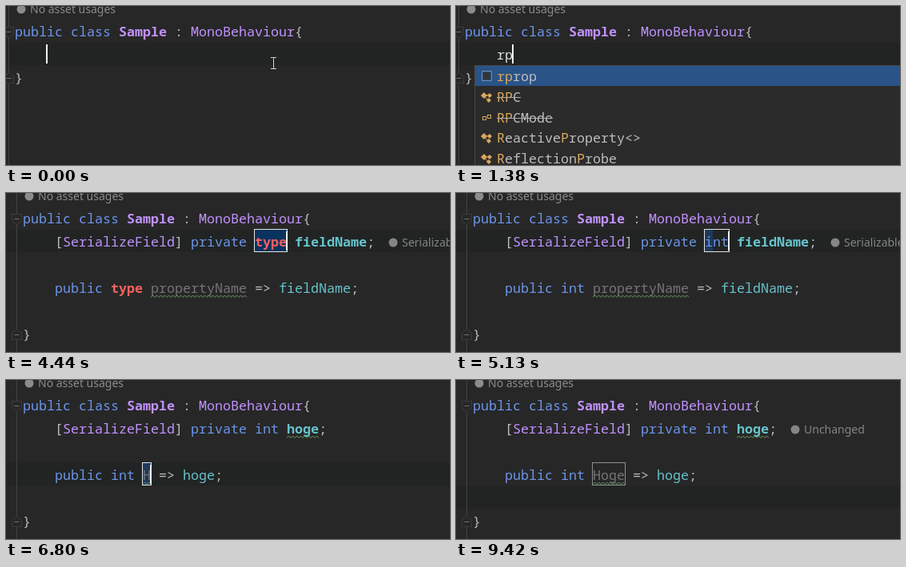
Recreate the animation shown at these times as an HTML page with a canvas. Size 555x199 px, loop 9.6 s.

```html
<!DOCTYPE html>
<html lang="en">
<head>
<meta charset="utf-8">
<title>Code template</title>
<style>
html, body { margin: 0; width: 100%; height: 100%; overflow: hidden; background: #272727; }
canvas { display: block; }
</style>
</head>
<body>
<canvas id="stage" width="555" height="199"></canvas>
<script>
const LOOP = 9600, W = 555, H = 199, CELL = 10, LINE = 29;
const g = document.getElementById('stage').getContext('2d');
const MONO = '16.667px "Noto Sans Mono", monospace';
const UI = '14px "Noto Sans", sans-serif';
const SELECT = '#08335e', LINKED = '#222e49';
// Capital letters mark the bold variant
const INK = { t: '#bdbdbd', w: '#dedede', k: '#6c95eb', c: '#c191ff', e: '#ff5f5f',
              f: '#66c3cc', d: '#747474', o: '#dba85c' };
const CARET_OFF = [[380, 880], [1880, 2370], [3940, 4440], [7930, 8130], [9420, LOOP]];
let left = 11;

const colX = col => left + col * CELL;
const rowY = row => 17 + (row - 1) * LINE;
const fill = (color, x, y, w, h) => { g.fillStyle = color; g.fillRect(x, y, w, h); };

function stroke(color, points, close) {
  g.strokeStyle = color;
  g.lineWidth = 1;
  g.beginPath();
  points.forEach(([x, y]) => g.lineTo(x, y));
  if (close) g.closePath();
  g.stroke();
}

function mono(str, style, x, y) {
  const key = style.toLowerCase();
  g.font = (key === style ? '' : 'bold ') + MONO;
  g.fillStyle = INK[key];
  g.fillText(str, x, y);
  return x + str.length * CELL;
}

function code(row, col, ...spans) {
  let x = colX(col);
  for (const [str, style] of spans) x = mono(str, style, x, rowY(row) + 21);
  return x;
}

function label(str, x, y, color) {
  g.fillStyle = color;
  g.beginPath();
  g.arc(x + 6, y - 5, 5.5, 0, 7);
  g.fill();
  g.font = UI;
  g.fillText(str, x + 17, y);
}

const mark = (color, row, col, len) => fill(color, colX(col), rowY(row), len * CELL, 28);

function frame(row, col, len, color = '#e4e4e4') {
  g.strokeStyle = color;
  g.lineWidth = 1;
  g.strokeRect(colX(col) - .5, rowY(row) - .5, len * CELL + 1, 28);
}

function squiggle(row, col, len) {
  const points = [];
  for (let i = 0; i <= len * 4; i++) {
    points.push([colX(col) + i * 2.5, rowY(row) + (i % 2 ? 24 : 26.5)]);
  }
  stroke('#6a9f62', points.filter(p => p[0] <= colX(col + len)));
}

function gutter(lastRow) {
  const x = left - 7.5;
  fill('#414141', x - .5, 0, 1, H);
  for (const [row, dir] of [[1, 1], [lastRow, -1]]) {
    const y = rowY(row) + 15.5;
    const points = [[-6, -6], [6, -6], [6, 2], [0, 7], [-6, 2]].map(([a, b]) => [x + a, y + b * dir]);
    g.fillStyle = '#272727';
    stroke('#505050', points, true);
    g.fill();
    stroke('#707070', [[x - 3, y], [x + 3, y]]);
  }
}

function pointer() {
  stroke('#d0d0d0', [[331, 64.5], [338, 64.5]]);
  stroke('#d0d0d0', [[334.5, 64], [334.5, 79]]);
  stroke('#d0d0d0', [[331, 78.5], [338, 78.5]]);
}

function icon(kind, y) {
  if (kind === 'template') {
    g.setLineDash([1, 1]);
    g.strokeStyle = '#c0c0c0';
    g.strokeRect(32.5, y - 6.5, 12, 12);
    g.setLineDash([]);
    fill('#343434', 34, y - 5, 9, 9);
  } else if (kind === 'enum') {
    g.strokeStyle = '#dba85c';
    g.strokeRect(33.5, y - 1.5, 4, 4);
    g.strokeRect(39.5, y - 3.5, 4, 4);
  } else {
    stroke('#dba85c', [[36, y - 1], [41, y - 3]]);
    stroke('#dba85c', [[36, y - 1], [40, y + 4]]);
    for (const [x, dy, r] of [[35, -2, 4], [42, -2, 3], [41, 4, 3]]) {
      g.fillStyle = '#dba85c';
      g.beginPath();
      g.moveTo(x - r, y + dy);
      g.lineTo(x, y + dy - r);
      g.lineTo(x + r, y + dy);
      g.lineTo(x, y + dy + r);
      g.fill();
    }
  }
}

// Each item: text, icon, indices of matched letters, struck out
const ONE_LETTER = [['rprop', 'template', [0]], ['readonly', 'template', [0]], ['ref', 'template', [0]],
  ['RuntimeInitializeOnLoad', 'class', [0]], ['RequireComponent', 'class', [0]]];
const TWO_LETTERS = [['rprop', 'template', [0, 1]], ['RPC', 'class', [0, 1], true],
  ['RPCMode', 'enum', [0, 1], true], ['ReactiveProperty<>', 'class', [0, 8]],
  ['ReflectionProbe', 'class', [0, 10]]];

function popup(items) {
  fill('#2b2b2b', 23, 74, W, H);
  fill('#484848', 23, 74, 1, H);
  fill('#484848', 23, 74, W, 1);
  fill('#2a5387', 24, 75, W, 25);
  items.forEach(([str, kind, hits, struck], i) => {
    const y = 88 + i * 25.8;
    icon(kind, Math.round(y));
    [...str].forEach((ch, n) => mono(ch, hits.includes(n) ? 'o' : 't', 51 + n * CELL, y + 6));
    if (struck) fill('#aaaaaa', 51, Math.round(y), str.length * CELL, 1);
  });
}

function base(lastRow, caretRow) {
  fill('#272727', 0, 0, W, H);
  fill('#212423', 0, rowY(caretRow), W, 28);
  gutter(lastRow);
  label('No asset usages', left + 2, 9, '#8c8c8c');
  code(1, 0, ['public class ', 'k'], ['Sample', 'C'], [' : ', 't'], ['MonoBehaviour', 'c'], ['{', 't']);
  code(lastRow, 0, ['}', 't']);
}

function caret(t, row, col) {
  if (!CARET_OFF.some(([a, b]) => t >= a && t < b)) fill('#f0f0f0', colX(col) - 1, rowY(row) + 2, 2, 24);
}

function drawTyping(t) {
  left = 11;
  base(3, 2);
  const word = t < 990 || t >= 2730 ? '' : t < 1200 ? 'r' : 'rp';
  code(2, 4, [word, 'w']);
  if (t < 990) pointer();
  if (t >= 1100 && t < 2730) popup(t < 1380 ? ONE_LETTER : TWO_LETTERS);
  caret(t, 2, 4 + word.length);
}

function drawTemplate(t) {
  left = 21;
  const typed = (old, word, times) => {
    const n = times.filter(s => t >= s).length;
    return n ? word.slice(0, n) : old;
  };
  const type = typed('type', 'int', [4560, 4690, 4810]);
  const field = typed('fieldName', 'hoge', [5430, 5530, 5640, 5740]);
  const prop = typed('propertyName', 'Hoge', [6800, 6880, 6950, 7030]);
  const stage = t < 5250 ? 0 : t < 6120 ? 1 : t < 8210 ? 2 : 3;
  const fieldCol = 30 + type.length - 0;
  const useCol = 11 + type.length + 1 + prop.length + 4;
  const [row, col, word, started] = [
    [2, 29, type, t >= 4560],
    [2, fieldCol, field, t >= 5430],
    [4, 15, prop, t >= 6800],
    [4, 15, prop, true]
  ][stage];

  base(6, stage === 3 ? 5 : row);
  if (stage < 3) mark(started ? '#20395a' : SELECT, row, col, started ? 1 : word.length);
  if (stage === 1) mark(LINKED, 4, useCol, field.length);

  const typeInk = t < 2870 ? 't' : t < 4560 ? 'E' : t < 5130 ? 'w' : 'k';
  const known = t >= 2930;
  const fieldSpans = stage === 1 && started
    ? [[field[0], 'F'], [field.slice(1), 'w']]
    : [[field, known ? 'F' : 't']];
  const propSpans = stage === 2
    ? started ? [[prop[0], 'd'], [prop.slice(1), 'w']] : [[prop, 'w']]
    : [[prop, t < 2990 ? 't' : 'd']];

  const end = code(2, 4, ['[', 't'], ['SerializeField', 'c'], ['] ', 't'], ['private ', 'k'],
    [type, t < 2870 ? 'w' : typeInk], [' ', 't'], ...fieldSpans, [';', 't']);
  code(4, 4, ['public ', 'k'], [type, typeInk], [' ', 't'], ...propSpans,
    [' => ', 't'], [field, known ? 'f' : 't'], [';', 't']);

  if (t >= 3490 && t < 6120) label('Serializable', end + 17, 67, '#858585');
  if (t >= 7430) label('Unchanged', end + 17, 67, '#858585');

  if (t >= 6370) squiggle(2, fieldCol, field.length);
  if (t >= 2990) squiggle(4, 12 + type.length, stage === 2 && started ? 1 : prop.length);
  frame(row, col, word.length, stage === 3 ? '#899489' : undefined);
  if (stage === 3) caret(t, 5, 4);
  else caret(t, row, col + word.length);
}

function tick(now) {
  const t = now % LOOP;
  if (t < 2800) drawTyping(t);
  else drawTemplate(t);
  requestAnimationFrame(tick);
}
requestAnimationFrame(tick);
</script>
</body>
</html>
```
